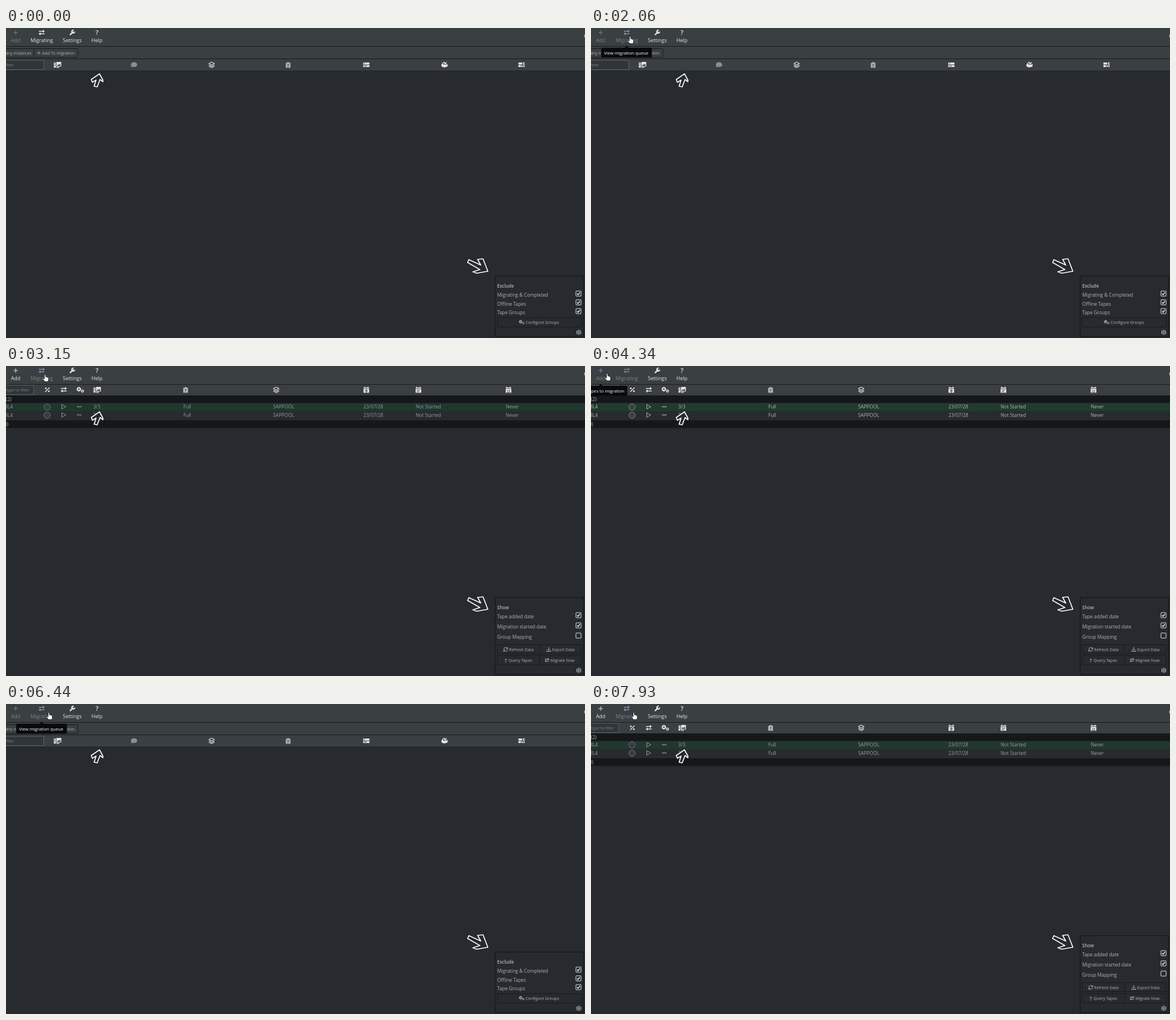
An HTML page that plays this animation: 1022x548 px, repeating every 7990 ms.

```html
<!DOCTYPE html>
<html lang="en">
<head>
<meta charset="utf-8">
<title>Tape migration</title>
<style>
  html, body { margin: 0; width: 100%; height: 100%; overflow: hidden; background: #272b2f; }
  svg { display: block; width: 100vw; height: 100vh; }
  text { font-family: "Open Sans", "Noto Sans", sans-serif; fill: currentColor; }
  .menu { font-size: 9px; text-anchor: middle; }
  .small { font-size: 7.2px; }
  .cell { font-size: 8.4px; }
  .opt { font-size: 8.35px; }
  .tip { font-size: 7.7px; font-weight: 500; }
  .end { text-anchor: end; }
  .mid { text-anchor: middle; }
  .line { fill: none; stroke: currentColor; }
  .solid { fill: currentColor; }
  .bar { fill: #3a3f42; }
  .group { fill: #151719; }
  .edge { fill: none; stroke: #181a1d; }
  .field { fill: #303539; stroke: #5b6063; }
  .bright { color: #e4e6e7; }
  .text { color: #b0b3b5; }
  .dim { color: #7d8184; }
  .sketch { fill: #272b2f; stroke: #fff; stroke-width: 1.7; stroke-linejoin: round; }
</style>
</head>
<body>
<svg viewBox="0 0 1022 548">
  <defs>
    <path id="plus" class="line" d="M-4 0H4M0-4V4"/>
    <g id="swap">
      <path class="line" stroke-width="1.4" d="M-5-2.2H3M5 2.2H-3"/>
      <path class="solid" d="M2-5 5.4-2.2 2 .4ZM-2-.4-5.4 2.2-2 5Z"/>
    </g>
    <g id="wrench">
      <path class="line" stroke-width="2.4" stroke-linecap="round" d="M-3.5 3.7 1-.8"/>
      <path class="line" stroke-width="2" d="M2.5-4A2.6 2.6 0 1 0 4.3-1.6"/>
    </g>
    <g id="photo">
      <path class="solid" d="M-6.5-4H-3V5H-6.5Z"/>
      <path class="solid" d="M-2-5H6.5V3H-2ZM-2 3.7H3V5.2H-2Z"/>
      <path fill="#3a3f42" d="M-1 2 1-1 2.3.4 4-2 5.7 2ZM-5.6-2.6h1.6v1.3h-1.6zm0 3h1.6v1.3h-1.6z"/>
    </g>
    <path id="comment" class="solid" d="M0-4.5C3.2-4.5 5.6-2.6 5.6-.2S3.2 4 0 4C-1 4-1.8 3.9-2.5 3.6-3.4 4.3-4.5 4.7-5.5 4.7-4.8 4-4.5 3-4.4 2.4-5.2 1.7-5.6.8-5.6-.2-5.6-2.6-3.2-4.5 0-4.5Z"/>
    <path id="layers" class="line" stroke-width="1.1" stroke-linejoin="round" d="M0-4.8 5-2.3 0 .2-5-2.3ZM-5 .3 0 2.8 5 .3M-5 2.6 0 5.1 5 2.6"/>
    <g id="clipboard">
      <path class="solid" d="M-4.2-3.6H-1.8A1.9 1.9 0 0 1 1.8-3.6H4.2V5.2H-4.2Z"/>
      <text class="mid" y="3.7" font-size="7" font-weight="700" style="fill:#3a3f42">?</text>
    </g>
    <g id="drive">
      <path class="solid" d="M-5.5-4H5.5V-.6H-5.5ZM-5.5.6H5.5V4H-5.5Z"/>
      <path stroke="#3a3f42" d="M-4 2.2H1M-4-2.2H-2"/>
    </g>
    <g id="disk">
      <path class="solid" d="M-5.5.2C-5.5-2-3-2.4-3-2.4L-1.5 0H3.5L4-2C5-1.5 5.5-1 5.5.2V2C5.5 4-3 6.5-5.5 2Z"/>
      <path class="line" stroke-width="1.5" d="M-3-2.5C-1.5-5.5.5-4.5 1-2.5M-.5-2.5 1-1 3.5-4.5"/>
    </g>
    <g id="grid">
      <path class="solid" d="M-5.5-4H1V-.5H-5.5ZM-5.5.5H-1V4H-5.5ZM0 .5H1.8V4H0ZM2-4H5.5V-2H2ZM2.7-1H5.5V1H2.7ZM2.7 2H5.5V4H2.7Z"/>
    </g>
    <g id="percent">
      <path class="line" stroke-width="1.5" d="M-3.8 3.8 3.8-3.8"/>
      <circle class="solid" cx="-2.7" cy="-2.5" r="1.5"/><circle class="solid" cx="2.7" cy="2.5" r="1.5"/>
    </g>
    <g id="gears" class="line">
      <circle cx="-2.4" cy="-1" r="2.4" stroke-width="2"/><circle cx="-2.4" cy="-1" r="3.7" stroke-dasharray="1.5 1.4"/>
      <circle cx="4" cy="2.3" r="1.6" stroke-width="1.3"/><circle cx="4" cy="2.3" r="2.6" stroke-width=".8" stroke-dasharray="1 1"/>
    </g>
    <g id="calendar">
      <path class="solid" d="M-5-4H-3.4V-5.5H-2V-4H2V-5.5H3.4V-4H5V-2.4H-5ZM-5-1.6H5V5.2H-5Z"/>
    </g>
    <g id="gear" class="line">
      <path d="M0-4.2 1.4-3 3.6-2.2 3.4 0 3.6 2.2 1.4 3 0 4.2-1.4 3-3.6 2.2-3.4 0-3.6-2.2-1.4-3Z"/><circle r="1.5"/>
    </g>
    <rect id="box" class="line" x="-4.5" y="-4.5" width="9" height="9" rx="1"/>
    <g id="checked">
      <use href="#box"/><path class="line" stroke-width="1.5" d="M-2.5 0-.7 2 2.6-2.2"/>
    </g>
    <path id="refresh" class="line" d="M-3.2-.5A3.2 3.2 0 0 1 3-1.3M3.5-3.6V-1H1M3.2.5A3.2 3.2 0 0 1-3 1.3M-3.5 3.6V1H-1"/>
    <path id="download" class="line" d="M0-4V1.5M-2.2-.6 0 1.6 2.2-.6M-3.5 1.5V3.5H3.5V1.5"/>
    <g id="job" class="text">
      <text class="cell end" x="12" y="3">3L4</text>
      <circle cx="72.500" cy=".5" r="5.5" fill="#3a3f42" stroke="#85898b"/>
      <path class="line" d="M98.500-4V4L105.500 0Z"/>
      <path class="line" stroke-width="1.8" stroke-dasharray="1.8 1" d="M125.500 0H133"/>
      <text class="cell" x="154" y="3">3/3</text>
      <text class="cell" x="313" y="3">Full</text>
      <text class="cell" x="471.500" y="3">SAPPOOL</text>
      <text class="cell" x="631" y="3">23/07/28</text>
      <text class="cell" x="723" y="3">Not Started</text>
      <text class="cell" x="882" y="3">Never</text>
    </g>
  </defs>

  <rect width="1022" height="548" fill="#272b2f"/>
  <rect class="bar" width="1022" height="32"/>
  <g class="bright">
    <use id="addIcon" href="#plus" x="17" y="8"/>
    <text id="addLabel" class="menu" x="17" y="25.300">Add</text>
    <use id="moveIcon" href="#swap" x="63" y="8"/>
    <text id="moveLabel" class="menu" x="63" y="25.300">Migrating</text>
    <use href="#wrench" x="117" y="8"/>
    <text class="menu" x="117" y="25.300">Settings</text>
    <text class="mid" x="160.500" y="12.300" font-size="11.500" font-weight="600">?</text>
    <text class="menu" x="160.500" y="25.300">Help</text>
    <circle class="line" cx="1024" cy="14" r="3"/>
  </g>

  <g id="tapes">
    <rect class="bar" y="32" width="1022" height="43"/>
    <path class="edge" d="M0 32.500H1022M0 54.500H1022"/>
    <path class="edge" fill="none" d="M-2 36.500H125.500Q127 36.500 127 38V50.500Q127 52 125.500 52H-2M49.500 36.500V52"/>
    <g class="text">
      <text class="small end" x="45" y="47">Query Instances</text>
      <use href="#plus" x="0" y="0" transform="translate(58 44) scale(.75)"/>
      <text class="small" x="64" y="47">Add To migration</text>
    </g>
    <rect class="field" x="-5" y="57" width="71.500" height="16.500"/>
    <text class="small end dim" x="14" y="68.300">type to filter</text>
    <g class="bright">
      <use href="#photo" x="91" y="65"/>
      <use href="#comment" x="226" y="65" color="#8b8f92"/>
      <use href="#layers" x="363" y="65"/>
      <use href="#clipboard" x="498" y="65" color="#a9adaf"/>
      <use href="#drive" x="636" y="65"/>
      <use href="#disk" x="774" y="65"/>
      <use href="#grid" x="910" y="65"/>
    </g>
  </g>

  <g id="queue">
    <rect class="bar" y="32" width="1022" height="20"/>
    <path class="edge" d="M0 32.500H1022"/>
    <rect class="field" x="-5" y="34" width="54" height="16.500"/>
    <text class="small end dim" x="41" y="45">type to filter</text>
    <g class="bright">
      <use href="#percent" x="73" y="42"/>
      <use href="#swap" x="102" y="42"/>
      <use href="#gears" x="131" y="42"/>
      <use href="#photo" x="161" y="42"/>
      <use href="#clipboard" x="317" y="42" color="#b4b7b9"/>
      <use href="#layers" x="477" y="42"/>
      <use href="#calendar" x="636" y="42"/>
      <use href="#calendar" x="728" y="42"/>
      <use href="#calendar" x="887" y="42"/>
      <path stroke="#3a3f42" stroke-width="1.200" d="M633 44H639M636 41V47M725 43H731M725 45.500H729M884 43.500H886M887 43.500H890M884 46H890"/>
    </g>
    <rect class="group" y="52" width="1022" height="13.500"/>
    <rect class="group" y="96" width="1022" height="13.500"/>
    <g class="text">
      <text class="cell" x="0" y="62">(2)</text>
      <text class="cell end" x="4" y="106">(0)</text>
    </g>
    <g id="rows">
      <rect y="65.500" width="1022" height="14" fill="#203b2e"/>
      <use href="#job" y="72"/>
      <use href="#job" y="86.500"/>
    </g>
  </g>

  <path class="sketch" d="M150.500 91 165 81 171 92 171 95 166 91 161 104 155.500 103 159 92 152.500 96Z"/>
  <path class="sketch" d="M817 409.500 838 419 832.500 409 842 408 850.500 430 831 433.500 824 431 836.500 427 814.800 414.500Z"/>

  <g id="exclude" class="text">
    <rect class="edge" x="863.500" y="438.500" width="156" height="107" stroke-width="1.500"/>
    <text x="867" y="459" font-size="8" font-weight="600">Exclude</text>
    <text class="opt" x="867" y="475">Migrating &amp; Completed</text>
    <text class="opt" x="867" y="490.500">Offline Tapes</text>
    <text class="opt" x="867" y="506">Tape Groups</text>
    <g class="bright">
      <use href="#checked" x="1010.500" y="469.500"/>
      <use href="#checked" x="1010.500" y="485"/>
      <use href="#checked" x="1010.500" y="500.500"/>
    </g>
    <rect class="edge" x="867.500" y="512" width="148" height="16.500"/>
    <use href="#gears" transform="translate(910 520) scale(.72)"/>
    <text class="small" x="917" y="523">Configure Groups</text>
  </g>

  <g id="show" class="text">
    <rect class="edge" x="863.500" y="409.500" width="156" height="136" stroke-width="1.500"/>
    <text x="867" y="430" font-size="8" font-weight="600">Show</text>
    <text class="opt" x="867" y="446">Tape added date</text>
    <text class="opt" x="867" y="464">Migration started date</text>
    <text class="opt" x="867" y="481.500">Group Mapping</text>
    <g class="bright">
      <use href="#checked" x="1010.500" y="440.500"/>
      <use href="#checked" x="1010.500" y="458.500"/>
      <use href="#box" x="1010.500" y="476.500"/>
    </g>
    <path class="edge" d="M867.500 492.500H1015.500V508.500H867.500ZM867.500 512H1015.500V528.500H867.500ZM941.800 492.500V508.500M941.800 512V528.500"/>
    <use href="#refresh" x="882" y="501"/>
    <text class="small" x="888" y="504">Refresh Data</text>
    <use href="#download" x="958" y="501"/>
    <text class="small" x="964" y="504">Export Data</text>
    <text x="880" y="523.500" font-size="9" font-weight="600">?</text>
    <text class="small" x="887" y="523">Query Tapes</text>
    <use href="#swap" transform="translate(955 520) scale(.75)"/>
    <text class="small" x="961" y="523">Migrate Now</text>
  </g>
  <use href="#gear" x="1011" y="538" color="#c4c7c9"/>

  <g id="moveTip" color="#fff">
    <path fill="#090a0b" d="M20 35H59.500L63 31.500 66.500 35H105.500Q107.500 35 107.500 37V50.500Q107.500 52.500 105.500 52.500H20Q18 52.500 18 50.500V37Q18 35 20 35Z"/>
    <text class="tip" x="23" y="46.700">View migration queue</text>
  </g>
  <g id="addTip" color="#fff">
    <path fill="#090a0b" d="M-5 35H13.500L17 31.500 20.500 35H62Q64 35 64 37V50.500Q64 52.500 62 52.500H-5Z"/>
    <text class="tip end" x="59" y="46.700">Add tapes to migration</text>
  </g>

  <g id="cursor" fill="#fff" stroke="#111" stroke-width=".7" stroke-linejoin="round">
    <path id="arrow" d="M0 0V11L2.500 8.700 4.200 12.300 5.800 11.600 4.200 8H7.600Z"/>
    <path id="hand" d="M-1.100 1Q-1.100 0 0 0T1.100 1V4.300Q2.400 3.600 3 4.800 4.200 4.300 4.600 5.400 6 5.200 6 6.800V9Q6 10.500 5.100 12.500H-.6L-3.300 8.600Q-4 7.500-3 7T-1.100 8Z"/>
  </g>
</svg>
<script>
const LOOP = 7990, VIEW_DELAY = 140;
const el = id => document.getElementById(id);
const between = (t, from, to) => t >= from && t < to;

// Piecewise value over time; keys are [ms, value].
function track(t, keys, ease = x => x) {
  if (t <= keys[0][0]) return keys[0][1];
  for (let i = 1; i < keys.length; i++) {
    const [t0, a] = keys[i - 1], [t1, b] = keys[i];
    if (t < t1) return a + (b - a) * ease((t - t0) / (t1 - t0));
  }
  return keys[keys.length - 1][1];
}
const smooth = x => x * x * (3 - 2 * x);

const pathX = [[120, 791], [570, 962], [950, 865], [1020, 860], [1780, 69], [3450, 69], [4270, 28.5],
  [5830, 28.5], [6090, 71], [6200, 71], [6440, 75.5]];
const pathY = [[120, 552], [570, 500], [950, 448], [1020, 446], [1780, 15], [3450, 15], [4270, 13.5],
  [5830, 13.5], [6090, 16], [6200, 16], [6440, 15]];
const moveTip = [[1750, 0], [1920, .85], [2060, 1], [2330, 1], [2450, 0],
  [6020, 0], [6230, .85], [6440, 1], [7040, 1], [7160, 0]];
const addTip = [[4060, 0], [4200, .8], [4340, 1], [5010, 1], [5110, 0]];
const headFade = [[0, 0], [70, .08], [540, 1]];
const rowFade = [[0, 0], [540, .66], [890, .84], [1300, 1]];

const opacity = (id, value) => el(id).style.opacity = value;
const visible = (id, on) => el(id).style.display = on ? "" : "none";
const isQueue = t => between(t, 2330, 5010) || t >= 7040;

function paintButton(name, enabled, hover) {
  el(name + "Label").style.color = enabled && !hover ? "#e4e6e7" : "#7d8184";
  el(name + "Icon").style.color = hover ? "#7893b5" : enabled ? "#e4e6e7" : "#7d8184";
}

function draw(t) {
  const queue = isQueue(t);
  const age = t < 2330 ? LOOP : t - (t < 5010 ? 2330 : t < 7040 ? 5010 : 7040);
  visible("tapes", !queue);
  visible("queue", queue);
  opacity("tapes", track(age, headFade));
  opacity("queue", track(age, headFade));
  opacity("rows", track(age, rowFade));

  const showPanel = age < VIEW_DELAY ? !queue : queue;
  visible("show", showPanel);
  visible("exclude", !showPanel);

  const overMove = between(t, 1740, 3640) || t >= 6000;
  const overAdd = between(t, 4030, 5900);
  paintButton("move", !queue, overMove);
  paintButton("add", queue, overAdd && queue);
  opacity("moveTip", track(t, moveTip));
  opacity("addTip", track(t, addTip));

  const x = track(t, pathX, smooth), y = track(t, pathY, smooth);
  el("cursor").setAttribute("transform", `translate(${x} ${y})`);
  visible("cursor", t >= 190);
  visible("hand", overMove || overAdd);
  visible("arrow", !(overMove || overAdd));
}

const start = performance.now();
function frame() {
  draw((performance.now() - start) % LOOP);
  requestAnimationFrame(frame);
}
frame();
</script>
</body>
</html>
```
